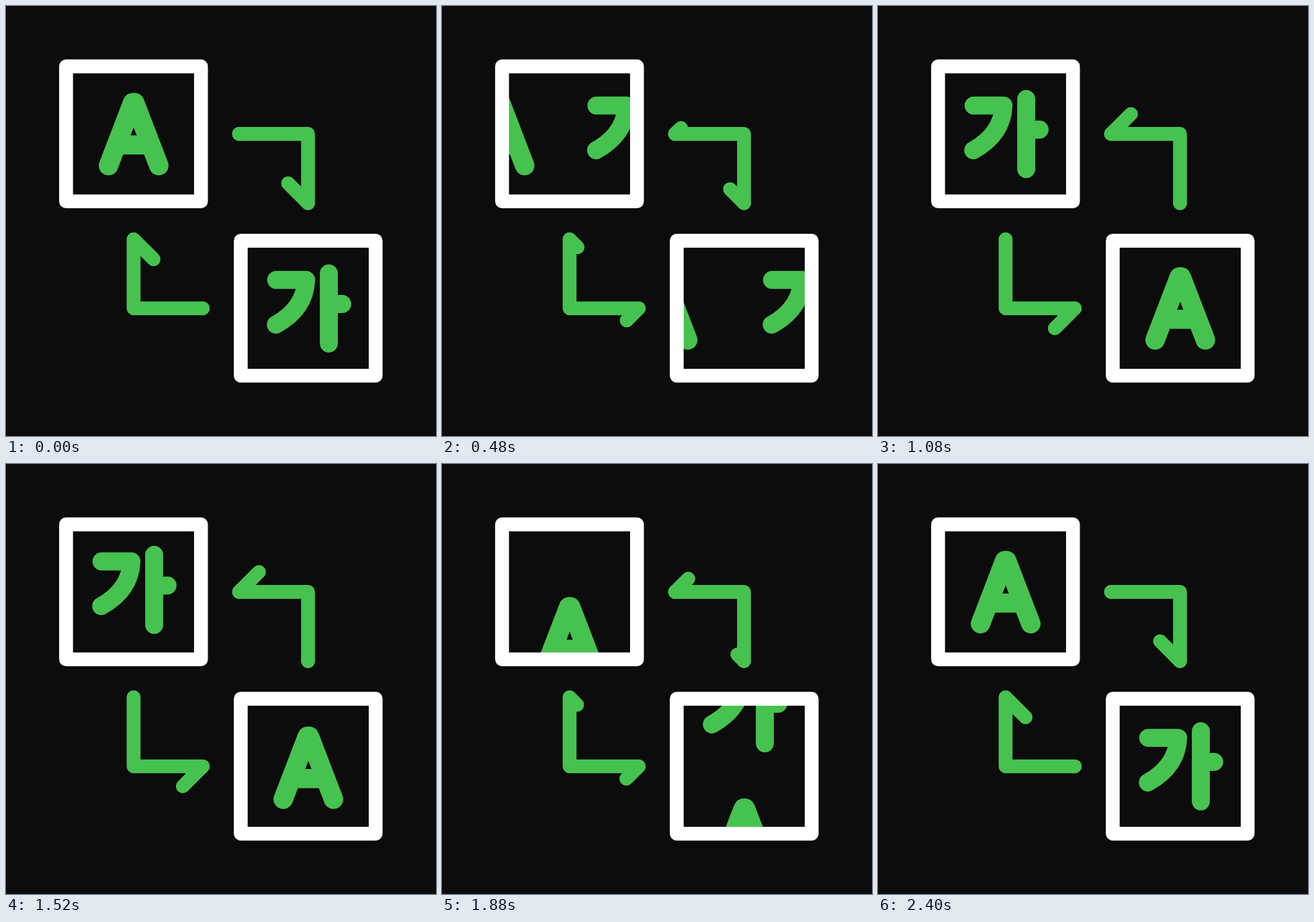
Recreate the animation shown at these times as an HTML page. Size 640 by 640 pixels, loop 2.8 s.

```html
<!DOCTYPE html>
<html lang="en">
<head>
<meta charset="utf-8">
<title>Translate icon</title>
<style>
  html, body { margin: 0; width: 100%; height: 100%; overflow: hidden; background: #0c0c0c; }
  svg { display: block; width: 100vw; height: 100vh; }
  .ink { fill: none; stroke: #46c24f; stroke-linecap: round; stroke-linejoin: round; }
  .frame { fill: none; stroke: #fff; stroke-width: 20.6; stroke-linejoin: round; }
  .arrow { stroke-width: 20.6; }
</style>
</head>
<body>
<svg viewBox="0 0 640 640">
  <defs>
    <clipPath id="window"><rect x="95" y="95" width="190" height="190"/></clipPath>
    <g id="latin" class="ink" stroke-width="29">
      <path d="M152.6 237.5 L188.6 143.7 H191.4 L227.4 237.5"/>
      <path d="M172 206.8 H208" stroke-width="28.5" style="stroke-linecap:butt"/>
    </g>
    <path id="hangul" class="ink" stroke-width="26.8"
      d="M142.2 148.2 H186.7 C185.6 177.5 169 199.5 141.7 214.7 M219.5 0"/>
    <path id="stem" class="ink" stroke-width="26.8" d="M220.5 138.4 V242.8 M220.5 184 H240.4"/>
    <rect id="box" class="frame" x="89.4" y="89.9" width="200.8" height="200.8"/>
  </defs>

  <g>
    <g clip-path="url(#window)">
      <use id="a1" href="#latin"/>
      <g id="g1"><use href="#hangul"/><use href="#stem"/></g>
    </g>
    <use href="#box"/>
  </g>
  <g transform="translate(260 259.5)">
    <g clip-path="url(#window)">
      <use id="a2" href="#latin"/>
      <g id="g2"><use href="#hangul"/><use href="#stem"/></g>
    </g>
    <use href="#box"/>
  </g>

  <g class="ink arrow">
    <path d="M346.8 190.4 H449.5 V293.4"/>
    <path d="M189.9 347.2 V450 H292.8"/>
    <path id="down"/><path id="left"/>
    <path id="up"/><path id="right"/>
  </g>
</svg>
<script>
const LOOP = 2800, HALF = 1400, STEP = 40, BARB = 29.7;
const $ = id => document.getElementById(id);
const clamp = v => Math.min(1, Math.max(0, v));
const smooth = u => u * u * (3 - 2 * u);

// Cubic bezier (x1, 0, x2, 1), solved by bisection.
function slide(u, x1 = 0.7, x2 = 0.13) {
  if (u <= 0 || u >= 1) return clamp(u);
  let lo = 0, hi = 1;
  for (let i = 0; i < 30; i++) {
    const s = (lo + hi) / 2, v = 1 - s;
    const x = 3 * x1 * s * v * v + 3 * x2 * s * s * v + s * s * s;
    if (x < u) lo = s; else hi = s;
  }
  return smooth(lo);
}

// Travel per half: first along x, then along y.
const letters = [
  { el: $('a1'), first: true,  travel: [-225, 175] },
  { el: $('g1'), first: false, travel: [163.5, -296] },
  { el: $('a2'), first: false, travel: [-227, 180] },
  { el: $('g2'), first: true,  travel: [192, -220] }
];
const slideTime = [1120, 1040];

// Barbs that swap on each arrow: home is shown at rest, away after the swap.
const arrows = [
  { home: ['down', 449.5, 293.4, -1, -1], away: ['left', 346.8, 190.4, 1, -1],
    start: [320, 280], time: [440, 515] },
  { home: ['up', 189.9, 347.2, 1, 1], away: ['right', 292.8, 450, -1, 1],
    start: [230, 280], time: [440, 478] }
];

function drawBarb([id, x, y, dx, dy], amount) {
  const n = BARB * amount;
  $(id).setAttribute('d', `M${x} ${y} l${dx * n} ${dy * n}`);
}

function draw(time) {
  const half = time < HALF ? 0 : 1;
  const t = time - half * HALF;
  const p = slide(clamp(t / slideTime[half]));
  for (const { el, first, travel } of letters) {
    const leaving = first === (half === 0);
    const d = travel[half] * (leaving ? p : 1 - p);
    el.setAttribute('transform', half ? `translate(0 ${d})` : `translate(${d} 0)`);
  }
  for (const { home, away, start, time: span } of arrows) {
    const q = smooth(clamp((t - start[half]) / span[half]));
    drawBarb(home, half ? q : 1 - q);
    drawBarb(away, half ? 1 - q : q);
  }
}

const origin = performance.now();
function tick() {
  const t = (performance.now() - origin) % LOOP;
  draw(Math.floor(t / STEP) * STEP);
  requestAnimationFrame(tick);
}
draw(0);
requestAnimationFrame(tick);
</script>
</body>
</html>
```
